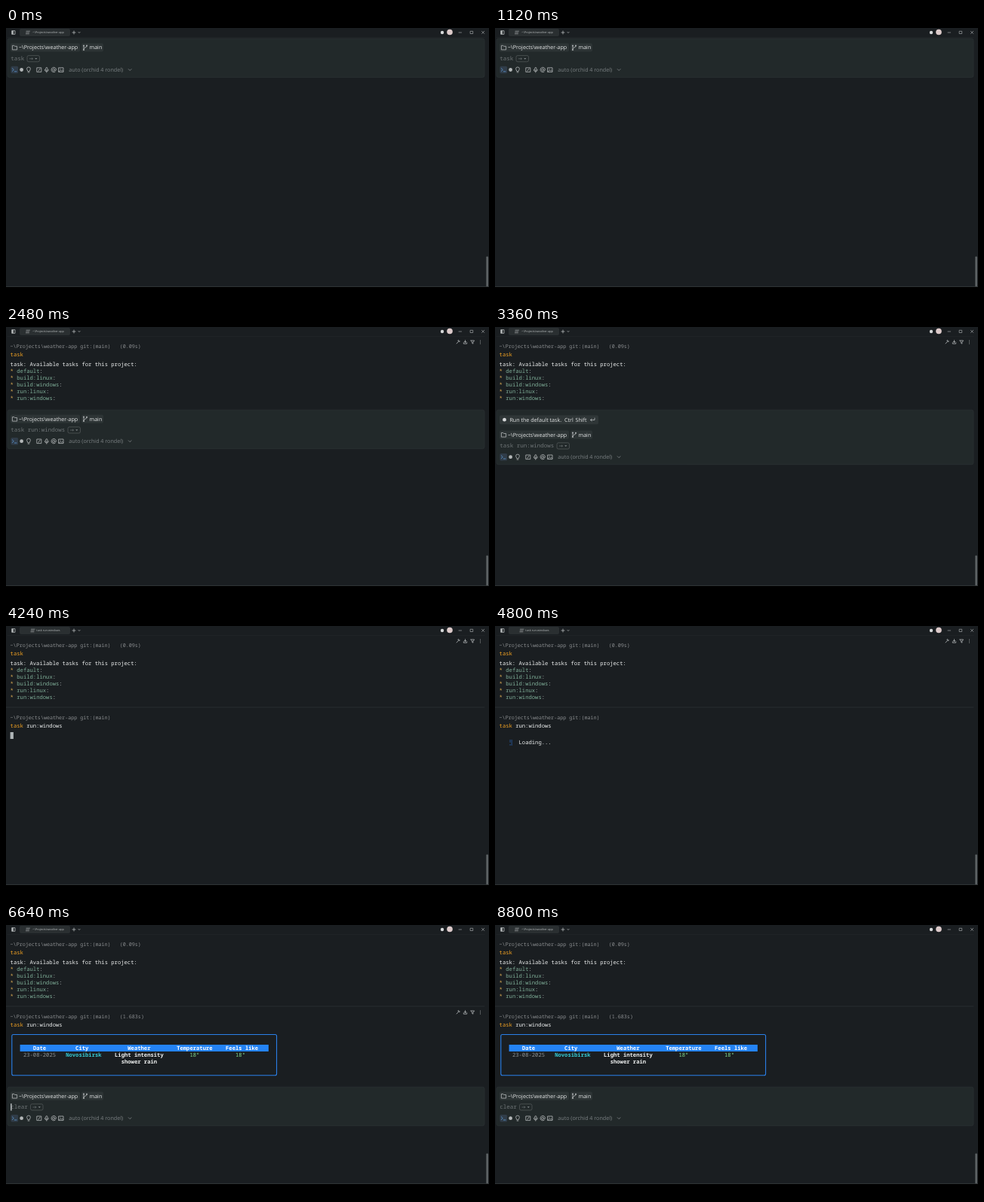
An HTML page for the animation above (8.88 s loop, 640 by 360 pixels).

```html
<!DOCTYPE html>
<html lang="en">
<head>
<meta charset="utf-8">
<title>Terminal session</title>
<style>
  html, body { margin: 0; width: 100%; height: 100%; overflow: hidden; background: #000; }
  svg { display: block; width: 100vw; height: 100vh; }
  text { white-space: pre; text-rendering: geometricPrecision; }
  .term { font: 7.208px "Noto Sans Mono", "DejaVu Sans Mono", monospace; }
  .cmd { font: 7.5px "Noto Sans Mono", "DejaVu Sans Mono", monospace; }
  .head { font: 6.72px "Noto Sans Mono", "DejaVu Sans Mono", monospace; fill: #8b8e90; }
  .ui { font: 7.15px "Open Sans", "Noto Sans", sans-serif; fill: #e4e6e6; }
  .tab { font: 3.83px "Open Sans", "Noto Sans", sans-serif; fill: #b4b8b9; text-anchor: middle; }
  .bold { font-weight: 600; }
  .icon { fill: none; stroke: #b4b8b9; stroke-width: .8; stroke-linecap: round; stroke-linejoin: round; }
</style>
</head>
<body>
<svg id="stage" viewBox="0 0 640 360"></svg>
<script>
const LOOP = 8880, CELL = 4.325, LEFT = 5.6, ROW = 9.03;
const WHITE = '#eef0f0', ORANGE = '#f2a222', GREEN = '#7fae98', BLUE = '#2a80ea', GHOST = '#6d7375';

const prompts = [
  { from: 0, to: 2000, y: 0, cmd: 'task', accept: 1680 },
  { from: 2160, to: 4160, y: 96.2, cmd: 'task run:windows', accept: 3600 },
  { from: 5680, to: LOOP, y: 201.2, cmd: 'clear', accept: LOOP }
];
const caretOn = [[720, 1120], [1520, 2000], [2160, 2480], [2880, 3360],
                 [3600, 4160], [5680, 6000], [6400, 6800], [7280, 7680]];
const within = (t, a, b) => t >= a && t < b;

const text = (x, y, str, cls, fill = '') =>
  `<text x="${x}" y="${y}" class="${cls}"${fill && ` fill="${fill}"`}>${str}</text>`;
const rect = (x, y, w, h, fill, r = 0, more = '') =>
  `<rect x="${x}" y="${y}" width="${w}" height="${h}" rx="${r}" fill="${fill}" ${more}/>`;
const icon = (d, more = '') => `<path class="icon" d="${d}" ${more}/>`;
const dot = (x, y, r, fill) => `<circle cx="${x}" cy="${y}" r="${r}" fill="${fill}"/>`;
const group = (id, body) => `<g id="${id}">${body}</g>`;
// Terminal text by column and output row, relative to the block's top
const cell = (col, row, str, fill, bold) =>
  text(LEFT + col * CELL, 40 + row * ROW, str, bold ? 'term bold' : 'term', fill);

const block = (id, y, cmd, args, time, output) =>
  `<g id="${id}" transform="translate(0 ${y})">
    ${text(LEFT, 16.1, '~\\Projects\\weather-app git:(main)', 'head')}
    ${text(LEFT, 26.6, `<tspan fill="${ORANGE}">${cmd}</tspan>${args}`, 'term', WHITE)}
    ${group(id + 'Out', text(150.7, 16.1, time, 'head') + output)}
  </g>`;

const tasks = ['default', 'build:linux', 'build:windows', 'run:linux', 'run:windows'];
const listing = cell(0, 0, 'task: Available tasks for this project:', WHITE) +
  tasks.map((name, i) => cell(0, i + 1, '*', '#dfae55') +
    cell(2, i + 1, `${name}<tspan fill="#b9bebe">:</tspan>`, GREEN)).join('');

const table =
  rect(7.8, 37.5, 350.8, 54.2, 'none', 2, `stroke="${BLUE}" stroke-width="1.1"`) +
  rect(18.6, 51, 329.3, 9, '#2483f5') +
  [[7, 'Date'], [20, 'City'], [36, 'Weather'], [51, 'Temperature'], [66, 'Feels like']]
    .map(([col, s]) => cell(col, 2, s, '#fff', true)).join('') +
  cell(4, 3, '23-08-2025', '#909496') + cell(17, 3, 'Novosibirsk', '#35c9d2', true) +
  cell(32, 3, 'Light intensity', WHITE, true) + cell(34, 4, 'shower rain', WHITE, true) +
  cell(55, 3, '18°', '#82dc8c') + cell(69, 3, '18°', '#82dc8c');

const tabTitle = (id, x, str) => group(id, text(56, 7.2, str, 'tab') +
  icon(`M${x - 2} 4.2h4.5M${x - 2.3} 6h4M${x - 2.6} 7.8h4`, 'style="stroke-width:.6"'));

const topBar =
  icon('M8 3.7h4v4.6h-4z') + rect(8, 3.7, 1.8, 4.6, '#b4b8b9') +
  rect(18, 1, 67, 10, '#2a2f31', 2) +
  tabTitle('tabPath', 29, '~\\Projects\\weather-app') + tabTitle('tabRun', 35.5, 'task run:windows') +
  icon('M88 6h4M90 4v4M96 5.5l1 1 1-1') +
  dot(578, 6, 2.2, '#d5d8d9') + dot(588, 5.5, 3.8, '#dccaca') +
  icon('M600 6h3.5M615.5 4.3h3.2v3.2h-3.2zM630.5 4.3l3.2 3.2M633.7 4.3l-3.2 3.2', 'style="stroke-width:.6"');

const hoverIcons = icon('M597 2l2.4-2.4M599-1.7l1.7 1.7 .4-1.2-1-1zM608.5-2.3v3M607.2-.7l1.3 1.4 1.3-1.4M606.3 .8v1.4h4.4v-1.4' +
  'M616-2h4.6l-1.7 2.2v2l-1.2-.6v-1.4z') + [-2, 0, 2].map(y => dot(628.5, y, .5, '#b4b8b9')).join('');

const toolbar =
  rect(6.5, 50.7, 9.6, 9.6, '#303c48', 1.5) +
  icon('M8.3 53.6l2 1.9-2 1.9M11.4 57.8h2.6', 'style="stroke:#5c96cf"') +
  dot(20.6, 55.5, 2.4, '#b4b8b9') +
  icon('M28.9 57.2c0-1-1.3-1.4-1.3-2.9a2.4 2.4 0 0 1 4.8 0c0 1.5-1.3 1.9-1.3 2.9zM29.1 58.9h1.8') +
  icon('M41.2 52.8h5.6v5.6h-5.6zM43 57.1l2-3') +
  icon('M52.7 53.5a1.1 1.1 0 0 1 2.2 0v2a1.1 1.1 0 0 1-2.2 0zM51.3 55.3a2.5 2.5 0 0 0 5 0M53.8 57.8v1.2') +
  icon('M64.7 55.6a1.5 1.5 0 1 1-3 0a1.5 1.5 0 1 1 3 0c0 1.6 1.8 1.3 1.8-.2a3.2 3.2 0 1 0-1.5 2.8') +
  icon('M70 52.8h6v5.6h-6zM70.3 57.8l2-2 1.2 1.2 1.1-1 1.3 1.3M71.8 54.5h.1') +
  text(83.3, 58, 'auto (orchid 4 rondel)', 'ui', '').replace('<text', '<text style="fill:#7d8385"') +
  icon('M162.3 54.6l1.9 1.9 1.9-1.9', 'style="stroke:#858a8c"');

const chips =
  rect(6, 20.2, 92, 11.4, '#2d3435', 2) + rect(100, 20.2, 29, 11.4, '#2d3435', 2) +
  icon('M8.8 23.3h2l.8 1h3v4.6h-5.8z') +
  text(17, 28.4, '~\\Projects\\weather-app', 'ui') +
  icon('M103 24.2v4M107 24.4c0 2-4 1-4 3.2') +
  [[103, 23.4], [107, 23.6], [103, 28.9]].map(([x, y]) => dot(x, y, 1, '#b4b8b9')).join('') +
  text(110.5, 28.4, 'main', 'ui');

const suggestion = rect(6, 7, 131, 12, '#2f3637', 2) + dot(12.5, 13, 2.4, '#d5d8d9') +
  text(19.4, 15.5, 'Run the default task.', 'ui') +
  text(92, 15.5, 'Ctrl', 'ui') + text(106.5, 15.5, 'Shift', 'ui') +
  icon('M132 10.8v2.5h-5.4M128.2 11.7l-1.6 1.6 1.6 1.6');

const ghostKey = rect(0, 36.6, 16.5, 8.2, 'none', 2, 'stroke="#565c5e" stroke-width=".7"') +
  icon('M3.4 40.8h4M6.3 39.8l1.1 1-1.1 1', 'style="stroke:#777d7f;stroke-width:.6"') +
  '<path d="M10.2 40h3.2l-1.6 1.8z" fill="#858b8d"/>';

const stage = document.getElementById('stage');
stage.innerHTML =
  rect(0, 0, 640, 344, '#1a1e21') + icon('M0 343.6h640', 'style="stroke:#3a3f41"') +
  topBar + icon('M2 12.6h632', 'style="stroke:#262b2d;stroke-width:.6"') +
  block('list', 12, 'task', '', '(0.09s)', listing) +
  group('rule', icon('M0 108h634', 'style="stroke:#2c3234;stroke-width:.7"')) +
  block('run', 108, 'task', ' run:windows', '(1.683s)', table) +
  group('hover', hoverIcons) +
  group('beam', rect(LEFT, 141, 4.3, 9, '#aeb4b6')) +
  group('loading', `<text id="spin" x="18.6" y="157" fill="#2f74d8" style="font:7.2px 'DejaVu Sans Mono',monospace"></text>` +
    text(LEFT + 6 * CELL, 157, 'Loading...', 'term', WHITE)) +
  group('prompt',
    `<rect id="box" x="2" y="14" width="632" rx="2.5" fill="#22292a" stroke="#2e3537" stroke-width=".6"/>` +
    `<g transform="translate(0 14)">${group('hint', suggestion)}</g>` +
    group('inner', chips + '<text id="line" class="cmd" x="6.3" y="43.2"></text>' +
      group('key', ghostKey) + rect(0, 36, 1.3, 9.4, '#cdd2d4', 0, 'id="caret"') + toolbar)) +
  rect(636.3, 303.5, 2.7, 40, '#5d6264', 1);

const $ = id => document.getElementById(id);
const show = (id, on) => $(id).style.display = on ? '' : 'none';
const move = (id, x, y) => $(id).setAttribute('transform', `translate(${x} ${y})`);

function drawPrompt(p, t) {
  const hinted = within(t, 2880, 3600), accepted = t >= p.accept;
  const [name, ...args] = p.cmd.split(' ');
  move('prompt', 0, p.y);
  move('inner', 0, hinted ? 21 : 0);
  $('box').setAttribute('height', hinted ? 72.5 : 51.5);
  show('hint', hinted);
  $('line').innerHTML = accepted
    ? `<tspan fill="${ORANGE}">${name}</tspan><tspan fill="${WHITE}"> ${args.join(' ')}</tspan>`
    : `<tspan fill="${GHOST}">${p.cmd}</tspan>`;
  show('key', !accepted);
  move('key', 10 + 4.5 * p.cmd.length, 0);
  $('caret').setAttribute('x', 6.2 + (accepted ? 4.5 * p.cmd.length : 0));
  show('caret', caretOn.some(([a, b]) => within(t, a, b)));
}

function draw(t) {
  const p = prompts.find(q => within(t, q.from, q.to));
  const running = within(t, 4160, 5600);
  show('prompt', p);
  if (p) drawPrompt(p, t);
  show('tabRun', running);
  show('tabPath', !running);
  show('list', t >= 2000);
  show('listOut', t >= 2080);
  show('rule', t >= 4160);
  show('run', t >= 4160);
  show('runOut', t >= 5600);
  show('hover', within(t, 2160, 6720));
  move('hover', 0, t < 6640 ? 20 : 116);
  show('beam', within(t, 4240, 4480));
  show('loading', within(t, 4640, 5600));
  $('spin').textContent = '⣾⣽⣻⢿⡿⣟⣯⣷'[Math.floor(Math.max(0, t - 4640) / 80) % 8];
}

const start = performance.now();
function tick() {
  draw((performance.now() - start) % LOOP);
  requestAnimationFrame(tick);
}
tick();
</script>
</body>
</html>
```
